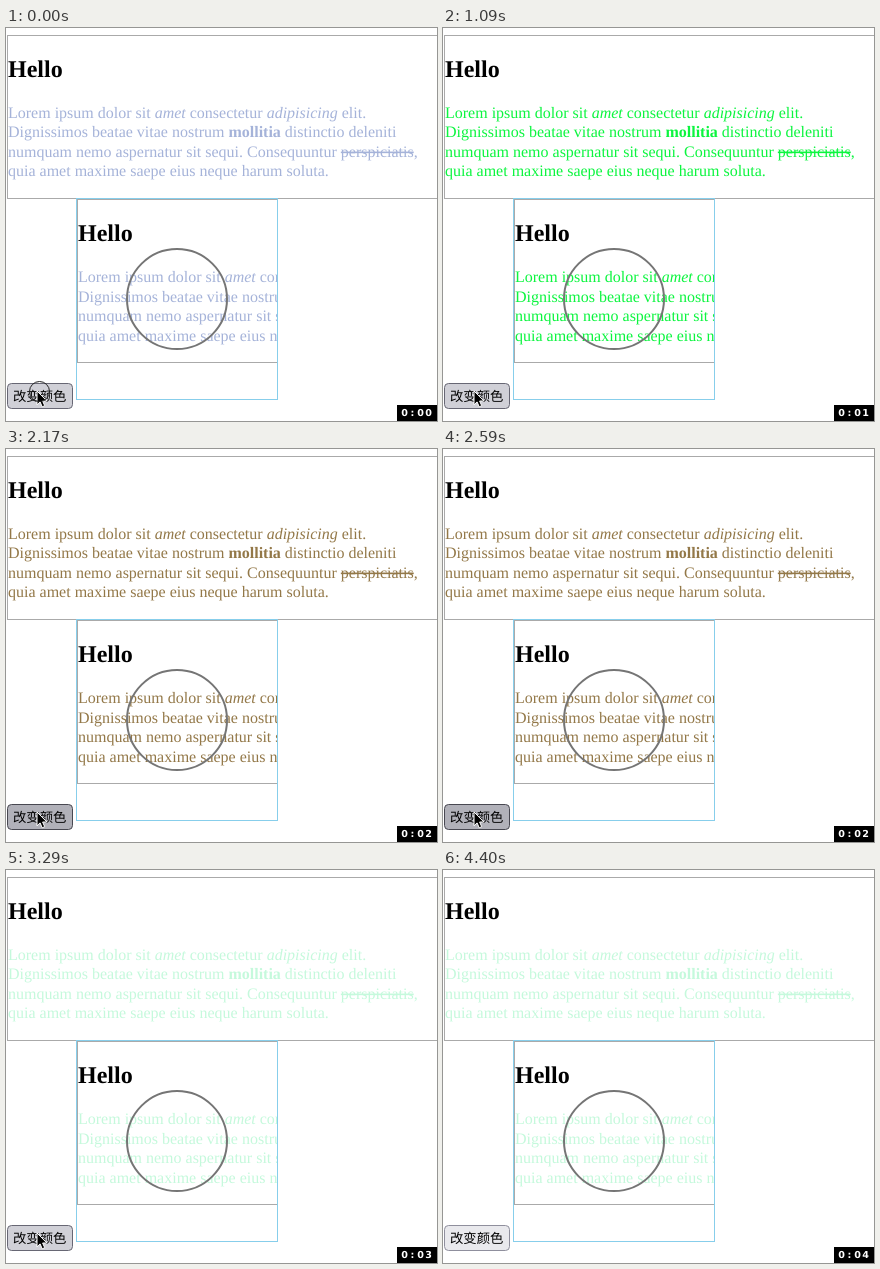
Write an HTML page that moves like this. It is 431 by 393 pixels and loops after 4.5 s.

```html
<!DOCTYPE html>
<html lang="en">
<head>
<meta charset="utf-8">
<title>Change colour</title>
<style>
  html, body { margin: 0; width: 100%; height: 100%; overflow: hidden; background: #fff; }
  svg { display: block; }
  text { text-rendering: geometricPrecision; }
  rect, circle { fill: none; }
  #card { font: 16px "Liberation Serif", serif; }
  #card rect { stroke: #aaa; shape-rendering: crispEdges; }
  h2, .head { font-size: 24px; font-weight: bold; }
  .label { font: 13.333px "Noto Sans CJK SC", "Noto Sans CJK", sans-serif; }
  #clock { font: bold 9.6px "DejaVu Sans", sans-serif; fill: #fff; text-anchor: middle; }
</style>
</head>
<body>
<svg id="stage" width="431" height="393" viewBox="0 0 431 393">
  <defs>
    <g id="card">
      <rect x="1.5" y="7.25" width="450" height="163"/>
      <text class="head" x="2" y="48.8" fill="#000">Hello</text>
      <g fill="currentColor">
        <text x="2" y="89.9">Lorem ipsum dolor sit <tspan font-style="italic">amet</tspan> consectetur <tspan font-style="italic">adipisicing</tspan> elit.</text>
        <text x="2" y="109.3">Dignissimos beatae vitae nostrum <tspan font-weight="bold">mollitia</tspan> distinctio deleniti</text>
        <text x="2" y="128.7">numquam nemo aspernatur sit sequi. Consequuntur <tspan text-decoration="line-through">perspiciatis</tspan>,</text>
        <text x="2" y="148.1">quia amet maxime saepe eius neque harum soluta.</text>
      </g>
    </g>
    <clipPath id="view"><path d="M71 171h200v200h-200z"/></clipPath>
  </defs>

  <use href="#card"/>
  <g clip-path="url(#view)">
    <use href="#card" transform="translate(70 164.5)"/>
    <circle cx="171" cy="271" r="50" stroke="#757575" stroke-width="2"/>
  </g>
  <rect x="70.5" y="170.5" width="201" height="201" stroke="#87ceeb"/>

  <rect id="button" x="1.5" y="355.5" width="65" height="25" rx="4"/>
  <text class="label" x="7" y="373">改变颜色</text>

  <path id="cursor" d="M0 0v13.8l3.1-2.9 2.1 4.9 2.5-1.1-2.1-4.7h4.3z" fill="#000" stroke="#fff"/>
  <circle id="ring" cx="33.5" cy="363.5" r="10" stroke="#222"/>

  <path d="M391 377h40v16h-40z"/>
  <text id="clock" x="398.5 406.5 414.5 422.5" y="388">0:00</text>
</svg>
<script>
  const LOOP = 4500, LEAVE = 3410, STEP = 28.5;
  const $ = id => document.getElementById(id);

  const colors = [[0, "#a5b3d9"], [380, "#7a1521"], [1090, "#0cf53f"], [1680, "#80759a"],
                  [2170, "#937848"], [2740, "#0d2f7a"], [3290, "#c5f9dc"]];
  const presses = [[260, 380], [910, 1090], [1500, 1680], [1950, 2200], [2590, 2760], [3150, 3290]];
  const rings = [[0, 60], [1500, 1680]];
  const ticks = [1000, 1980, 2940, 3910];
  const idle = ["#e9e9ed", "#8f8f9d"], hover = ["#d0d0d7", "#676774"], active = ["#b1b1b9", "#484851"];

  const within = (spans, t) => spans.some(([from, to]) => t >= from && t < to);
  const show = (el, on) => el.setAttribute("visibility", on ? "visible" : "hidden");

  function draw(t) {
    $("stage").style.color = colors.findLast(([from]) => t >= from)[1];

    // The pointer speeds up downwards and leaves through the bottom edge.
    const step = t < LEAVE ? 0 : Math.min(8, Math.floor((t - LEAVE) / STEP) + 1);
    const x = 31 + step * 0.5, y = 363 + 32 * (step / 8) ** 1.5;
    $("cursor").setAttribute("transform", `translate(${x} ${y})`);
    show($("cursor"), step < 8);
    show($("ring"), within(rings, t));

    const [fill, stroke] = within(presses, t) ? active : y < 381 ? hover : idle;
    $("button").style.fill = fill;
    $("button").style.stroke = stroke;
    $("clock").textContent = "0:0" + ticks.filter(tick => t >= tick).length;
  }

  const start = performance.now();
  function frame(now) {
    draw(Math.max(0, now - start) % LOOP);
    requestAnimationFrame(frame);
  }
  draw(0);
  requestAnimationFrame(frame);
</script>
</body>
</html>
```
